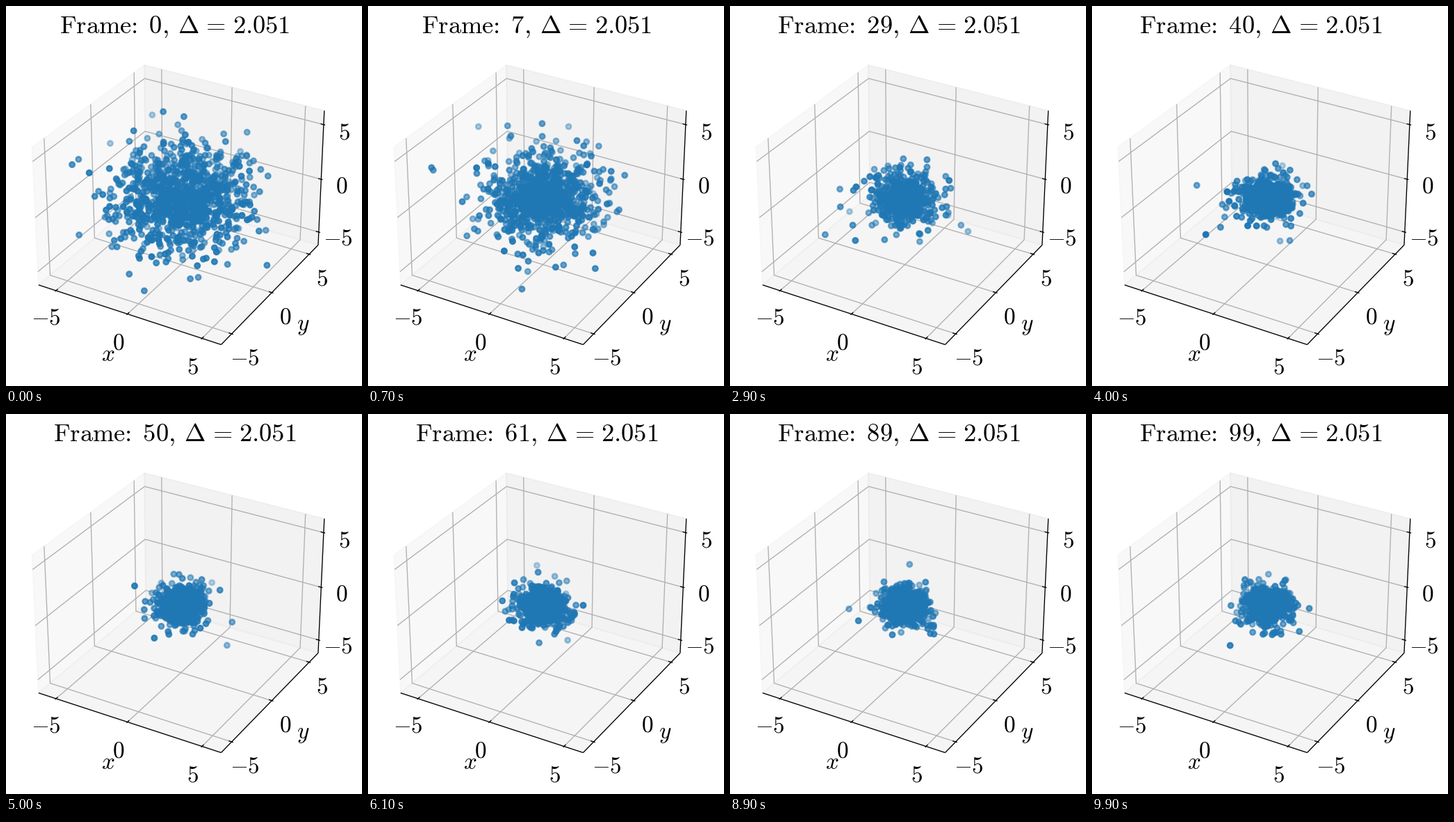
Recreate the animation shown at these times as a matplotlib script. Size 512 px wide and 546 px high, loop 10 s.

```python
import numpy as np
import matplotlib.pyplot as plt
from matplotlib.animation import FuncAnimation

plt.rcParams["mathtext.fontset"] = "cm"

W, H, DPI = 512, 546, 120
STEPS, INTERVAL = 100, 100
WALKERS, ALPHA, DELTA = 1000, 1.7, 2.051
LIM = 6.25                               # half range of every axis
BOX = np.array([0.59524, 0.59524, 0.44643]) / LIM
CENTER, SCALE, DIST = (251.6, 276.0), 2527, 10
BLUE = (0x1F / 255, 0x77 / 255, 0xB4 / 255)

ELEV, AZIM = np.radians(30), np.radians(-60)
EYE = np.array([np.cos(ELEV) * np.cos(AZIM), np.cos(ELEV) * np.sin(AZIM), np.sin(ELEV)])
RIGHT = np.array([-np.sin(AZIM), np.cos(AZIM), 0])
UP = np.cross(EYE, RIGHT)


def project(points):
    """Perspective view: pixel positions and distance from the eye."""
    p = np.asarray(points, float) * BOX
    depth = DIST - p @ EYE
    x = CENTER[0] + SCALE * (p @ RIGHT) / depth
    y = CENTER[1] - SCALE * (p @ UP) / depth
    return np.column_stack([x, y]), depth


def walk():
    """Metropolis walk towards the density exp(-2 a r)."""
    rng = np.random.default_rng(5)
    pos = rng.normal(scale=2.0, size=(WALKERS, 3))
    states = []
    for _ in range(STEPS):
        trial = pos + DELTA * (rng.random(pos.shape) - 0.5)
        gain = np.linalg.norm(pos, axis=1) - np.linalg.norm(trial, axis=1)
        accept = rng.random(WALKERS) < np.exp(np.minimum(0, 2 * ALPHA * gain))
        pos = np.where(accept[:, None], trial, pos)
        states.append(pos)
    return states


fig = plt.figure(figsize=(W / DPI, H / DPI), dpi=DPI, facecolor="white")
ax = fig.add_axes([0, 0, 1, 1])
ax.set_xlim(0, W)
ax.set_ylim(H, 0)
ax.axis("off")


def line(points, color, z):
    xy, _ = project(points)
    ax.plot(xy[:, 0], xy[:, 1], color=color, lw=0.8, zorder=z,
            solid_capstyle="butt", solid_joinstyle="round")


def pane(points, gray):
    xy, _ = project(points)
    ax.fill(xy[:, 0], xy[:, 1], color=(gray,) * 3, alpha=0.5, lw=1, zorder=1)


def label(text, x, y, size=20):
    return ax.text(x, y, f"${text}$", fontsize=size, ha="center", va="baseline", zorder=4)


L = LIM
pane([(-L, -L, -L), (-L, L, -L), (-L, L, L), (-L, -L, L)], 0.95)
pane([(-L, L, -L), (L, L, -L), (L, L, L), (-L, L, L)], 0.90)
pane([(-L, -L, -L), (L, -L, -L), (L, L, -L), (-L, L, -L)], 0.925)

line([(-L, -L, -L), (L, -L, -L)], "black", 3)
line([(L, -L, -L), (L, L, -L)], "black", 3)
line([(L, L, -L), (L, L, L)], "black", 3)

INNER, OUTER = L - 0.2, L + 0.1
for t in (-5, 0, 5):
    line([(t, -L, -L), (t, L, -L), (t, L, L)], "#b0b0b0", 2)
    line([(L, t, -L), (-L, t, -L), (-L, t, L)], "#b0b0b0", 2)
    line([(-L, -L, t), (-L, L, t), (L, L, t)], "#b0b0b0", 2)
    line([(t, -INNER, -L), (t, -OUTER, -L)], "black", 3)
    line([(INNER, t, -L), (OUTER, t, -L)], "black", 3)
    line([(INNER, L, t), (OUTER, L, t)], "black", 3)

tick_spots = {
    "-5": [(57.5, 458), (343.5, 516), (477.5, 344)],
    "0": [(161.5, 493), (401.5, 456.5), (482.5, 268.5)],
    "5": [(268, 528.5), (454.5, 401.5), (486.5, 191)],
}
for text, spots in tick_spots.items():
    for x, y in spots:
        label(text, x, y)
label("x", 147, 509.5)
label("y", 427, 466)

title = label("0", 242.5, 39.5, 21.9)
dots = ax.scatter([], [], s=20, linewidths=1.5, zorder=5)
states = walk()


def draw(i):
    xy, depth = project(states[i])
    order = np.argsort(-depth)
    xy, depth = xy[order], depth[order]
    rgba = np.empty((len(xy), 4))
    rgba[:, :3] = BLUE
    rgba[:, 3] = 1 - 0.7 * (depth - depth.min()) / np.ptp(depth)
    dots.set_offsets(xy)
    dots.set_color(rgba)
    title.set_text(rf"$\text{{Frame:}}\hspace{{0.5}}{i}\text{{,}}\hspace{{0.41}}"
                   rf"\Delta\hspace{{0.11}}=\hspace{{0.11}}{DELTA}$")
    return dots, title


anim = FuncAnimation(fig, draw, frames=STEPS, interval=INTERVAL, repeat=True)
plt.show()
```
